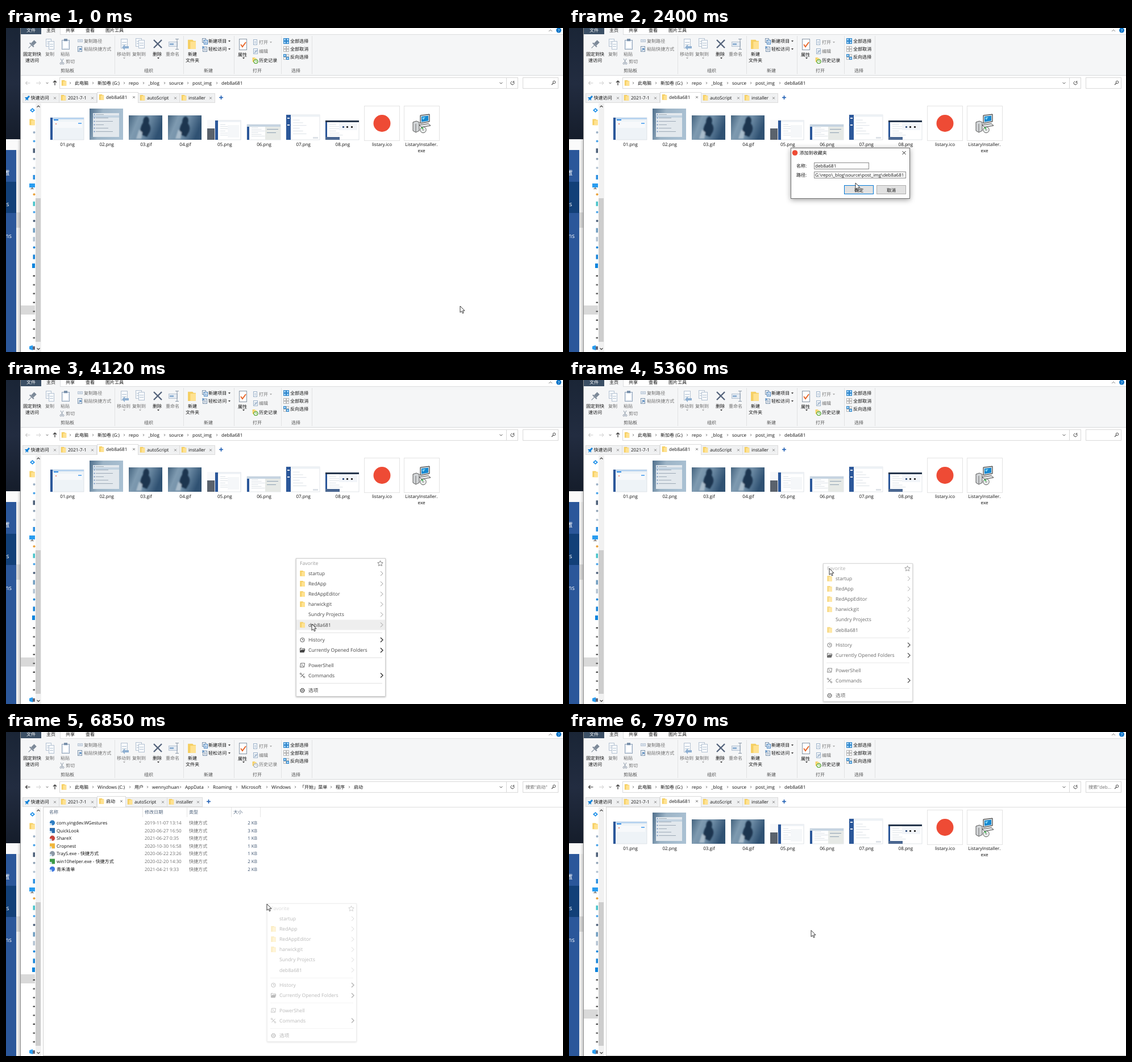
Write an HTML page that moves like this. It is 980 px wide and 571 px high and loops after 8 s.

```html
<!DOCTYPE html>
<html lang="zh-CN">
<head>
<meta charset="utf-8">
<title>Favorite folders</title>
<style>
html, body { margin: 0; width: 100%; height: 100%; overflow: hidden; background: #fff; }
svg { display: block; width: 980px; height: 571px; }
text { font: 8.05px "Open Sans", "Noto Sans CJK SC", "Noto Sans CJK", sans-serif; text-rendering: geometricPrecision; white-space: pre; }
.menu text { font-size: 8.65px; }
.menu { filter: drop-shadow(0 1px 1.5px rgba(0,0,0,.3)); }
#dialog { filter: drop-shadow(0 2px 5px rgba(0,0,0,.38)); }
</style>
</head>
<body>
<svg id="stage" viewBox="0 0 980 571" xmlns="http://www.w3.org/2000/svg"></svg>
<script>
const INK = '#111', GREY = '#707070', BLUE = '#1683d8', STEEL = '#b4c2d2';

// drawing helpers; text is placed by the middle of its line
const T = (x, y, s, c = INK, a = 'start', size) =>
  `<text x="${x}" y="${y + 3}" fill="${c}" text-anchor="${a}"${size ? ` style="font-size:${size}px"` : ''}>${s}</text>`;
const M = (x, y, s, c) => T(x, y, s, c, 'middle');
const R = (x, y, w, h, f, o = '') => `<rect x="${x}" y="${y}" width="${w}" height="${h}" fill="${f}" ${o}/>`;
const B = (x, y, w, h, f, s) => R(x + .5, y + .5, w - 1, h - 1, f, `stroke="${s}"`);
const C = (x, y, r, f, s = 'none', w = 1) => `<circle cx="${x}" cy="${y}" r="${r}" fill="${f}" stroke="${s}" stroke-width="${w}"/>`;
const P = (d, s = 'none', w = 1, f = 'none') => `<path d="${d}" stroke="${s}" stroke-width="${w}" fill="${f}"/>`;
const G = (id, body, o = '') => `<g id="${id}" ${o}>${body}</g>`;
const chev = (x, y, s, c, w = 1) => P(`M${x - s / 2} ${y - s}l${s} ${s}l${-s} ${s}`, c, w);
const down = (x, y, s, c, w = 1) => P(`M${x - s} ${y - s / 2}l${s} ${s}l${s} ${-s}`, c, w);
const tri = (x, y, c = '#333') => P(`M${x - 2} ${y - 1}h4l-2 2.4z`, 'none', 0, c);
const cross = (x, y, s, c, w = 1) => P(`M${x - s} ${y - s}l${2 * s} ${2 * s}m0 ${-2 * s}l${-2 * s} ${2 * s}`, c, w);
const folder = (x, y, k = 1) => `<g transform="translate(${x} ${y}) scale(${k})">` +
  P('M-4.2 -5h5l1 1.2h2.4v8.6h-8.4z', 'none', 0, '#f5cf62') + P('M-1.6 -3h5.8v7.8h-5.8z', 'none', 0, '#ffe291') + '</g>';
const sheet = (x, y, w, h, s = STEEL) => B(x, y, w, h, '#f8fafc', s) +
  R(x + 2, y + h * .35, w - 4, 1, s) + R(x + 2, y + h * .6, w - 4, 1, s);

function backdrop() {
  return R(0, 0, 26, 196, 'url(#night)') + R(0, 196, 26, 19, '#fafafa') +
    R(0, 215, 18, 356, '#2b579a') + R(0, 271, 18, 55, '#124078') +
    R(18, 215, 8, 356, '#efefef') + R(18, 325, 8, 27, '#d6d6d6') +
    T(-4, 256, '置', '#fff', 'start', 10.5) + T(5.5, 311, 'es', '#fff', 'end', 10.5) + T(10, 367, 'ns', '#fff', 'end', 10.5) +
    R(20, 196, 6, 375, 'url(#edge)') + R(26, 0, 954, 571, '#fff') + R(25, 0, 1, 571, '#8d8d8d');
}

function ribbon() {
  let s = R(26, 11, 954, 72, '#f5f6f7') + R(95, 11, 885, 1, '#dcdddf') + R(26, 83, 954, 1, '#d9dadc') +
    R(26, 0, 36, 11, '#3b4f65') + R(62, 0, 34, 12, '#f5f6f7') + R(95, 0, 1, 12, '#dcdddf') +
    M(44, 4, '文件', '#fff') + M(79, 4, '主页') + M(113, 4, '共享') + M(148, 4, '查看') +
    P('M955 6l3-3l3 3', '#888') + C(972.5, 4, 4.5, '#0a74c8') + T(972.5, 4, '?', '#fff', 'middle', 7);
  for (const x of [191, 312, 401, 484, 538]) s += R(x, 14, 1, 67, '#e1e2e3');
  for (const [x, n] of [[108, '剪贴板'], [251, '组织'], [356, '新建'], [442, '打开'], [510, '选择']]) s += M(x, 75, n, '#555');
  for (const [x, y, n, c] of [[46, 46, '固定到快'], [46, 57, '速访问'], [77, 46, '复制', GREY], [104, 46, '粘贴', GREY],
    [207, 46, '移动到', GREY], [234, 46, '复制到', GREY], [266, 46, '删除'], [293, 46, '重命名', GREY],
    [328, 46, '新建'], [328, 57, '文件夹'], [416, 47, '属性']]) s += M(x, y, n, c);
  for (const [x, y, n, c] of [[137, 23, '复制路径', GREY], [137, 37, '粘贴快捷方式', GREY], [105, 59, '剪切', GREY],
    [356, 23, '新建项目'], [356, 37, '轻松访问'], [445, 25, '打开', GREY], [445, 41, '编辑', GREY],
    [500, 23, '全部选择'], [500, 37, '全部取消'], [500, 51, '反向选择']]) s += T(x, y, n, c);
  s += tri(208, 53, '#aaa') + tri(236, 53, '#aaa') + tri(268, 53) + tri(418, 53) + tri(393, 23) + tri(393, 37) + tri(466, 25, '#aaa');
  // clipboard
  s += `<g transform="translate(46 29) rotate(45)">` + R(-3, -8, 6, 8, '#7d8a99') + R(-5, 0, 10, 2, '#7d8a99') + R(-.5, 2, 1, 7, '#7d8a99') + '</g>' +
    sheet(70, 19, 10, 14) + sheet(75, 23, 10, 15) + B(98, 21, 14, 17, '#e8eef5', '#8fa2b8') + R(101, 24, 8, 11, '#fff') + R(102, 19, 6, 4, '#7890aa') +
    B(126, 20, 9, 5, '#e8eef5', STEEL) + R(128, 22, 5, 1, STEEL) + sheet(126, 32, 8, 10, '#7890aa') + P('M128 40l4-4m-3 0h3v3', '#3f7fc0') +
    P('M96 54l4 7m1-7l-4 7', '#8b98a8') + C(96.5, 62.5, 1.5, 'none', '#8b98a8') + C(100.5, 62.5, 1.5, 'none', '#8b98a8');
  // organise
  s += sheet(202, 19, 12, 17) + P('M216 32h-7v-3l-5 5l5 5v-3h7z', 'none', 0, '#8fb0d2') + sheet(228, 18, 11, 15) + sheet(233, 21, 11, 15) +
    cross(267, 28, 7, '#55647c', 2.4) + B(286, 24, 16, 9, '#e6ecf3', STEEL) + R(288, 27, 7, 3, '#8fb0d2') + P('M298 19.500h6m-3 0v18m-3 0h6', '#8997a8');
  // new and open
  s += folder(327, 29, 1.65) + sheet(345, 18, 7, 8, '#7890aa') + sheet(348, 21, 7, 8, '#3f7fc0') + sheet(346, 33, 8, 9, '#7890aa') + P('M345 36l3-3m-3 0h3v3', '#3f7fc0') +
    B(410, 19, 14, 20, '#fff', '#8795a5') + P('M413 29l3 4l6-8', '#e8682c', 2) +
    sheet(435, 20, 7, 10, '#9cb2c9') + sheet(435, 36, 8, 10, '#9cb2c9') + P('M437 44l5-5', '#9cb2c9', 1.5);
  // select: all, none, alternate
  for (const [y, on] of [[18, [1, 1, 1, 1]], [32, [0, 0, 0, 0]], [46, [1, 0, 0, 1]]])
    on.forEach((f, i) => s += B(488 + i % 2 * 5, y + (i >> 1) * 5, 5, 5, f ? '#9fd0f5' : '#fff', f ? '#2a83c9' : '#b5b5b5'));
  return s;
}

const history = (id, c, ring) => G(id, T(445, 57, '历史记录', c) + folder(437, 56, .8) + C(439.5, 59, 3.4, '#fff', ring, 1.3) + P('M439.5 57v2h2', ring, .9));

function bars() {
  return B(94, 87, 787, 20, '#fff', '#d9d9d9') + B(880, 87, 21, 20, '#fff', '#d9d9d9') + B(909, 87, 63, 20, '#fff', '#d9d9d9') +
    P('M53 97h8m-3-3l3 3l-3 3', '#ccc') + down(72.5, 97, 1.8, '#555') + P('M86 101v-8m-3 3l3-3l3 3', '#333', 1.2) +
    folder(102, 97) + down(871, 97, 2.5, '#555') + P('M893.5 95.2a3 3 0 1 1-3-1.2m3-1v2.4h-2.4', '#444') +
    C(964.5, 95.5, 2.2, 'none', '#444') + P('M963 97.2l-3 3', '#444', 1.2);
}
const arrow = (id, c) => G(id, P('M34.500 97h8m-5-3l-3 3l3 3', c, 1.1));
const crumbs = list => list.map(([x, n]) => chev(x - 8, 97, 1.7, '#555', .9) + T(x, 97, n)).join('');

function tab(x, w, name, on, icon = folder(x + 8, on ? 122 : 123)) {
  const y = on ? 113 : 115;
  return B(x, y, w + 1, 132 - y, on ? '#fff' : '#f0f1f2', '#dcdcdc') + (on ? R(x + 1, 131, w - 1, 1, '#fff') : '') + icon +
    T(x + 16, on ? 122 : 123, name) + cross(x + w - 7, on ? 122 : 123.5, 1.9, '#777', .9);
}
function tabs(name, w) {
  const e = 160 + w, pin = P('M33 122l4 0l3-3l2 2l-3 3l0 4l-2-2l-3 2l1-3z', 'none', 0, BLUE);
  return tab(29, 64, '', 0, pin) + T(43.5, 123, '快速访问') + tab(93, 66, '2021-7-1') + tab(160, w, name, 1) +
    tab(e, 73, 'autoScript') + tab(e + 73, 62, 'installer') + P(`M${e + 143} 122.500h7m-3.5-3.5v7`, '#1557b0', 1.5);
}

function sidebar() {
  let s = P('M42 145l4.5-4l4.5 4l-4.5 4z', 'none', 0, '#1d8fe8') + C(46.5, 145, 1.5, '#fff') + folder(46, 166, 1.1);
  const small = ['#9aafc4', '#4aa3e8', '#4c5f78', '#8fa2b5', '#b3c3d2', '#2a8fe0', '', '#eaa23c', '#48c3c9', '#4aa3e8', '#4c5f78', '#6f9cc0', '#b3c3d2', '#1683d8', '#1683d8'];
  small.forEach((c, i) => {
    const y = 182 + i * 15.6;
    if (c) s += i % 3 == 2 || i == 12 ? R(47.5, y - 1, 3.5, 8, c) : C(49.5, y + 2, 2, c);
  });
  s += R(41, 274, 10, 7, '#2a9df0') + R(45, 281, 2, 2, '#777') + R(43, 283, 6, 1, '#777') + R(46, 415, 5, 8, '#0a84dd');
  for (let i = 0; i < 8; i++) s += R(47.5, 436 + i * 15.6, 3.5, 2, '#444') + R(48, 435 + i * 15.6, 3, 1, '#c4c4c4');
  return s + P('M41 561l6-2v9l-6-2z', 'none', 0, '#2a9df0') + R(47, 561, 4, 6, '#667') +
    R(52, 133, 10, 438, '#f1f1f1') + R(52, 300, 9, 253, '#cdcdcd') + P('M54.5 139.5l2.5-2.5l2.5 2.5', '#444', 1.2) + down(57, 565.5, 2.5, '#444', 1.2);
}

// a window in miniature: blue side strip, pale rows of text
function windowThumb(x, y, w, h, side, paper = '#fff') {
  let s = R(x, y, w, h, paper, 'stroke="#d3d9e0" stroke-width=".7"') + R(x, y, w, h * .08, '#edf1f5') + R(x, y, side, h, '#2b579a');
  for (let i = 0; i < 6; i++) s += R(x + side + 4, y + h * (.2 + i * .11), w * (.2 + i % 3 * .1), .7, '#ccd4dc');
  return s;
}
function photoThumb(x) {
  return R(x, 154, 59, 43, 'url(#mist)') + `<g filter="url(#soft)">` +
    P(`M${x + 20} 187c0-10 2-16 5-20c0-6 2-11 6-11c5 1 6 7 4 12c4 5 4 10 2 15l-5 9z`, 'none', 0, '#1b3550') +
    P(`M${x + 13} 195l5-16l6 5l-2 11z`, 'none', 0, '#a9bccb') + '</g>';
}
function files() {
  let s = windowThumb(78, 158, 59, 39, 4, '#eef3f7') + R(82, 158, 55, 3, '#b9d4ef') + R(84, 161, 8, 2, '#2f8be6') + R(84, 165, 50, 11, '#f7f9fb') + R(84, 176, 50, 18, '#eef3f7') + C(88, 169, 1, '#e26a5a') + R(127, 167, 6, 2, '#69aef0');
  s += R(147, 142, 59, 55, 'url(#haze)') + R(153, 150, 46, 42, '#e2e8ed') + R(153, 154, 46, 4, '#c3d3e1');
  for (let i = 0; i < 6; i++) s += R(158, 152 + i * 6, 14 + i % 3 * 8, .8, '#8c9bab') + C(155.5, 152.5 + i * 6, 1, '#5b83b5');
  s += photoThumb(216) + photoThumb(285) +
    R(354, 162, 60, 35, '#f7f8fa') + R(354, 177, 13, 20, '#5a626c') + windowThumb(368, 163, 45, 34, 5) + R(390, 171, 20, 22, '#f5f7f9') +
    windowThumb(424, 170, 59, 27, 4) + R(424, 170, 59, 4, '#c6d4e1') + R(456, 174, 27, 23, '#e6e9e6') + R(459, 178, 20, 1, '#8da0b2') + R(459, 184, 16, 1, '#8da0b2') +
    windowThumb(493, 153, 59, 44, 8) + R(495, 158, 4, 2, '#fff') + R(495, 170, 4, 2, '#fff') + R(540, 192, 9, 3, '#dde2e7') +
    windowThumb(562, 163, 59, 34, 3) + R(562, 163, 59, 3, '#26364c') + R(586, 166, 32, 14, '#f2f5f9') + R(592, 173, 3, 3, '#3d5a86') + R(599, 173, 3, 3, '#333') + R(607, 173, 3, 3, '#333') + R(562, 192, 25, 5, '#4a6791');
  s += B(630, 137, 63, 62, '#fff', '#e3e3e3') + C(661.5, 168, 15, '#ee4b35') + B(700, 137, 63, 62, '#fff', '#e3e3e3');
  // installer box, screen and disc
  s += P('M716 166l6-2l5 2v15l-6 3l-5-3z', '#333', .8, '#d2d5d7') + P('M721 169v14', '#555', .8) +
    P('M729 154l16-2v13l-16 3z', '#222', 1, '#dfe2e3') + P('M731 156l12-1.500v9l-12 2z', 'none', 0, '#1688d0') + P('M732 158l6-1l-4 5z', 'none', 0, '#7fd4f5') +
    P('M727 171l16-2.500l4 3.500l-16 3z', '#222', .8, '#e4e6e7') + C(734, 179.5, 5.2, '#eef2f0', '#333', .8) +
    P('M734 179.500l-4-3a5 5 0 0 1 4-2z', 'none', 0, '#5ec06d') + C(734, 179.5, 1.3, '#fff', '#555', .6);
  ['01.png', '02.png', '03.gif', '04.gif', '05.png', '06.png', '07.png', '08.png', 'listary.ico', 'ListaryInstaller.']
    .forEach((n, i) => s += M(108 + i * 69.2, 205, n));
  return s + M(731, 216, 'exe');
}

function list() {
  let s = '';
  for (const [x, n] of [[76, '名称'], [244, '修改日期'], [322, '类型'], [400, '大小']]) s += T(x, 141, n, '#4c607a');
  for (const x of [240, 318, 396, 447]) s += R(x, 133, 1, 17, '#e5e5e5');
  s += P('M153.500 134l2.500-2l2.500 2', '#777', .8);
  [['com.yingdev.WGestures', '2019-11-07 13:14', 2, '#2f7fc4'], ['QuickLook', '2020-06-27 16:50', 3, '#2a6db0'],
   ['ShareX', '2021-06-27 0:35', 1, '#c8443c'], ['Cropnest', '2020-10-30 16:58', 1, '#f0b63c'],
   ['TrayS.exe - 快捷方式', '2020-06-22 23:26', 1, '#8b98a6'], ['win10helper.exe - 快捷方式', '2020-02-20 14:30', 2, '#3c9a48'],
   ['青禾清单', '2021-04-21 9:33', 2, '#3f78e0']].forEach(([n, d, k, c], i) => {
    const y = 160 + i * 13.6;
    s += (i % 2 ? R(77, y - 4.5, 9, 9, c) : C(81.5, y, 4.6, c)) + R(76.5, y + 1, 4, 4, '#fff') + P(`M77.500 ${y + 4}l2-2`, BLUE, .9) +
      T(89, y, n) + T(244, y, d, '#6d6d6d') + T(322, y, '快捷方式', '#6d6d6d') + T(442, y, k + ' KB', '#3e5470', 'end');
  });
  return s;
}

const favs = ['startup', 'RedApp', 'RedAppEditor', 'harwickgit', 'Sundry Projects', 'deb8a681'];
const STEP = 18.1;
const rowsOf = n => [...favs.slice(0, n).map((_, i) => 27 + i * STEP), ...[35.5, 53.6, 80, 98, 124.5].map(v => v + n * STEP)];
function menu(n) {
  const o = n * STEP, c = '#444', y = rowsOf(n).slice(n);
  let s = B(0, 0, 158, Math.round(135 + o), '#fff', '#cfcfcf') + `<rect class="hover" x="1" width="156" height="18" fill="#eee"/>` +
    T(7, 9, 'Favorite', '#9a9a9a') + `<circle class="glow" cx="148.500" cy="9" r="7" fill="#e6e6e6"/>` +
    `<path class="star" d="M148.500 4.500l1.400 3l3.300.4l-2.400 2.300l.6 3.300l-2.900-1.600l-2.900 1.600l.6-3.300l-2.400-2.300l3.300-.4z" fill="none"/>`;
  favs.slice(0, n).forEach((f, i) => {
    const fy = 27 + i * STEP;
    if (i != 4) s += `<g class="${i % 5 ? '' : 'late'}">${folder(11.5, fy)}</g>`;
    s += T(22, fy, f, c) + chev(151, fy, 4, '#999');
  });
  for (const v of [22.5, 66.5, 111]) s += R(6, Math.round(o + v), 146, 1, '#e2e2e2');
  ['History', 'Currently Opened Folders', 'PowerShell', 'Commands', '选项'].forEach((t, i) => {
    s += T(22, y[i], t, c);
    if (i < 2 || i == 3) s += chev(151, y[i], 4, '#333', 1.4);
  });
  return s + C(11.5, y[0], 3.6, 'none', c, .9) + P(`M11.500 ${y[0] - 2}v2h1.800`, c, .9) +
    P(`M7.500 ${y[1] + 3.5}v-7h3l1 1h4v1.500`, c, 1) + P(`M7 ${y[1] + 4}l2-5h7.500l-2 5z`, 'none', 0, c) +
    P(`M8.500 ${y[2] - 3.5}h7l-1 7h-7zM10 ${y[2] - 2}l2 2l-2.500 2m3 0h1.500`, c, .8) +
    cross(11.5, y[3], 3, c, 1) + C(8.5, y[3] - 3, 1.2, '#fff', c, .8) + C(14.5, y[3] + 3, 1.2, '#fff', c, .8) +
    C(11.5, y[4], 3.2, 'none', c, 1) + C(11.5, y[4], 1.2, 'none', c, .8) + `<circle cx="11.500" cy="${y[4]}" r="3.900" fill="none" stroke="${c}" stroke-dasharray="1.500 1.560"/>`;
}

function dialog() {
  return B(390, 211, 210, 90, '#fff', '#6f6f6f') + C(397.5, 220, 4.8, '#ee4b35') + T(405.5, 220, '添加到收藏夹') + cross(589.5, 220, 3, '#222', 1) +
    T(400, 243, '名称:') + B(431, 237, 97, 12, '#fff', '#8a8a8a') + T(433, 243, 'deb8a681') +
    T(400, 259, '路径:') + B(431, 253, 162, 12, '#fff', '#8a8a8a') + T(433, 259, 'G:\\repo\\_blog\\source\\post_img\\deb8a681') +
    B(484, 277, 52, 16, '#e1e1e1', '#0078d7') + M(510, 285.5, '确定') + B(541, 277, 52, 16, '#e1e1e1', '#adadad') + M(567, 285.5, '取消');
}

const grad = (id, d, ...stops) => `<linearGradient id="${id}" ${d}>${stops.map(([p, c, a = 1]) => `<stop offset="${p}" stop-color="${c}" stop-opacity="${a}"/>`).join('')}</linearGradient>`;

document.getElementById('stage').innerHTML =
  '<defs>' + grad('night', 'x2="0" y2="1"', [0, '#1a2536'], [.5, '#222c40'], [1, '#151d2b']) +
  grad('edge', '', [0, '#000', 0], [1, '#000', .18]) +
  grad('mist', 'y2=".3"', [0, '#45647f'], [.3, '#7e9ab0'], [.6, '#6f8da6'], [1, '#2f5172']) +
  grad('haze', 'y2=".2"', [0, '#4f6f8c'], [.4, '#9db4c6'], [1, '#a9c0d2']) +
  '<filter id="soft"><feGaussianBlur stdDeviation="1.2"/></filter></defs>' +
  backdrop() + ribbon() + G('picTab', M(191, 4, '图片工具')) + history('histOn', INK, '#55a630') + history('histOff', GREY, '#a5b0bb') +
  bars() + arrow('backOff', '#ccc') + arrow('backOn', '#333') +
  G('pathA', crumbs([[121, '此电脑'], [161, '新加卷 (G:)'], [216, 'repo'], [250, '_blog'], [287, 'source'], [328, 'post_img'], [379, 'deb8a681']])) +
  G('pathB', crumbs([[121, '此电脑'], [161, 'Windows (C:)'], [226, '用户'], [257, 'wennyzhuan'], [315, 'AppData'], [364, 'Roaming'], [414, 'Microsoft'], [467, 'Windows'], [517, '「开始」菜单'], [580, '程序'], [612, '启动']])) +
  G('findA', T(914, 97, '搜索"deb...', GREY)) + G('findB', T(914, 97, '搜索"启动"', GREY)) +
  G('frame', R(65, 132, 915, 1, '#dcdcdc') + R(65, 132, 1, 439, '#d0d0d0') + R(65, 570, 915, 1, '#c4c4c4')) +
  G('tabsA', tabs('deb8a681', 72)) + G('tabsB', tabs('启动', 50)) +
  R(26, 489, 25, 16, '#d9d9d9', 'id="picked"') + sidebar() + G('files', files()) + G('list', list()) +
  G('menu5', menu(5), 'class="menu"') + G('menu6', menu(6), 'class="menu"') + G('dialog', dialog()) +
  G('cursor', P('M0 0V11.300L2.600 8.900L4.400 12.900L6.200 12.100L4.500 8.200H8Z', '#222', .9, '#fff'));

const $ = id => document.getElementById(id);
const show = (id, on) => $(id).setAttribute('display', on ? 'inline' : 'none');

// time, x, y
const path = [[0, 799, 490], [280, 480, 318], [860, 480, 318], [1480, 628, 324], [1540, 628, 324], [1600, 630, 326], [1840, 630, 326],
  [2400, 504, 273], [2560, 508, 283], [2720, 508, 283], [3320, 510, 314], [3740, 510, 314], [4120, 538, 430], [4360, 540, 432],
  [4500, 540, 432], [4920, 447, 323], [5260, 447, 323], [5360, 458, 332], [5720, 484, 350], [6040, 484, 350], [6320, 459, 303],
  [6850, 459, 303], [7400, 500, 421], [7650, 500, 421], [7960, 426, 349.5]];
// rows, x, y, opens, closes
const menus = [[5, 480, 318, 740, 1760], [6, 510, 314, 3630, 4470], [6, 447, 323, 5250, 5930], [6, 459, 302, 6800, 7540]];
const clamp = v => Math.max(0, Math.min(1, v));

function pointer(t) {
  const i = path.findIndex(p => p[0] > t);
  if (i < 0) return path[path.length - 1].slice(1);
  const [a, b] = [path[i - 1], path[i]], u = (t - a[0]) / (b[0] - a[0]), e = u * u * (3 - 2 * u);
  return [a[1] + (b[1] - a[1]) * e, a[2] + (b[2] - a[2]) * e];
}

function placeMenu(t, cx, cy) {
  show('menu5', false);
  show('menu6', false);
  const m = menus.find(k => t > k[3] && t < k[4] + 120);
  if (!m) return;
  const [n, x, y, from, to] = m, g = $('menu' + n), part = k => g.querySelectorAll('.' + k);
  show('menu' + n, true);
  g.setAttribute('transform', `translate(${x} ${y})`);
  g.setAttribute('opacity', Math.min(clamp((t - from) / 140), 1 - clamp((t - to) / 120)));
  const inside = cx > x && cx < x + 158, row = rowsOf(n).find(r => Math.abs(cy - y - r) < 9);
  const h = part('hover')[0], star = inside && cx > x + 142 && cy < y + 17;
  h.setAttribute('y', (row || 0) - 9);
  h.setAttribute('opacity', inside && row ? 1 : 0);
  part('glow')[0].setAttribute('opacity', star ? 1 : 0);
  part('star')[0].setAttribute('stroke', star ? '#222' : '#808080');
  part('late').forEach(e => e.setAttribute('opacity', from == 6800 && t < 6960 ? 0 : 1));
}

function draw(t) {
  const b = t >= 6120 && t < 7720, moved = t >= 6120;
  for (const id of ['picTab', 'histOn', 'pathA', 'tabsA', 'files']) show(id, !b);
  for (const id of ['histOff', 'pathB', 'tabsB', 'list', 'findB']) show(id, b);
  show('findA', moved && !b);
  show('backOn', moved);
  show('backOff', !moved);
  show('frame', moved);
  $('picked').setAttribute('y', b ? 427 : 489);
  show('dialog', t >= 1920 && t < 2760);
  const [x, y] = pointer(t);
  placeMenu(t, x, y);
  $('cursor').setAttribute('transform', `translate(${x.toFixed(1)} ${y.toFixed(1)})`);
}

const start = performance.now();
(function tick() {
  draw((performance.now() - start) % 8000);
  requestAnimationFrame(tick);
})();
</script>
</body>
</html>
```
